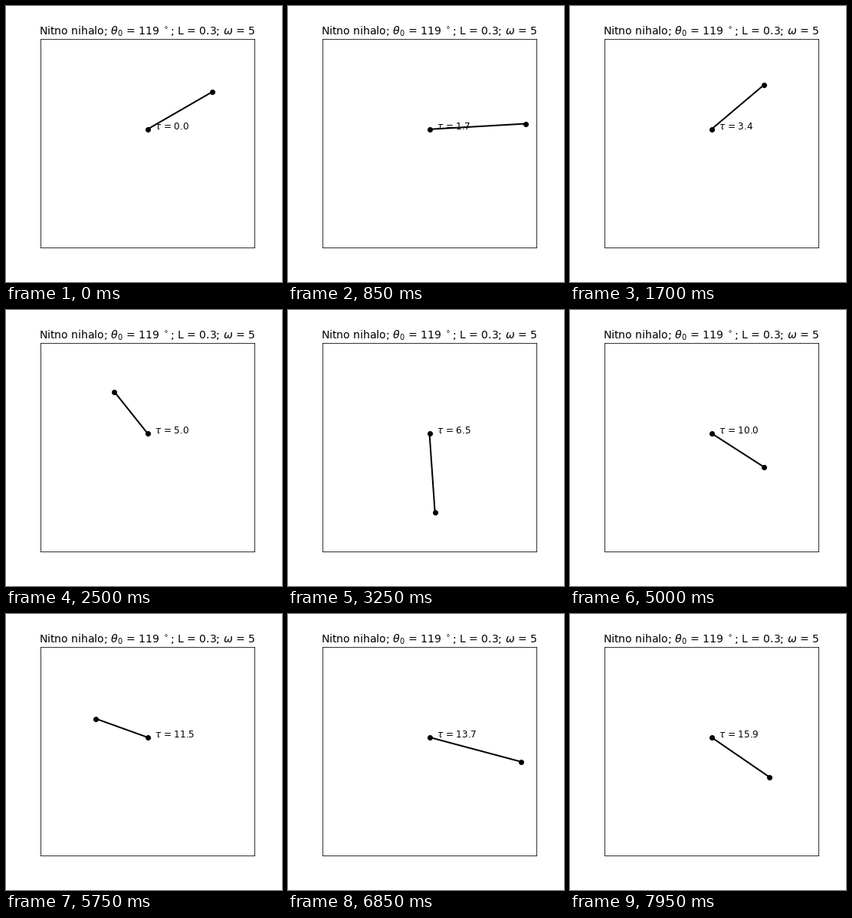
A matplotlib script for the animation above (8000 ms loop, 360 by 360 pixels).

```python
import numpy as np
import matplotlib.pyplot as plt
from matplotlib.animation import FuncAnimation

AMP, OMEGA, THETA0 = 0.3, 5, 2 * np.pi / 3
FRAMES, DT, SUB = 160, 0.1, 100
SCALE, PIVOT_Y = 97.2, 160.8  # pixels per unit, pivot height from the top


def length(t):
    return 1 + AMP * np.sin(t)


def deriv(t, s):
    """String pendulum whose length is driven harmonically."""
    theta, v = s
    rate = AMP * np.cos(t)
    return np.array([v, -(2 * rate * v + OMEGA**2 * np.sin(theta)) / length(t)])


def rk4(t, s, h):
    a = deriv(t, s)
    b = deriv(t + h / 2, s + h / 2 * a)
    c = deriv(t + h / 2, s + h / 2 * b)
    d = deriv(t + h, s + h * c)
    return s + h / 6 * (a + 2 * b + 2 * c + d)


def solve():
    s, h = np.array([THETA0, 0.0]), DT / SUB
    angles = [s[0]]
    for k in range((FRAMES - 1) * SUB):
        s = rk4(k * h, s, h)
        if (k + 1) % SUB == 0:
            angles.append(s[0])
    return np.array(angles)


tau = DT * np.arange(FRAMES)
theta = solve()
xs = length(tau) * np.sin(theta)
ys = -length(tau) * np.cos(theta)

fig = plt.figure(figsize=(5, 5), dpi=72, facecolor="white")
fig.subplots_adjust(left=0.125, right=0.9, bottom=0.125, top=0.88)
ax = fig.add_subplot()
ax.set(xticks=[], yticks=[])
ax.set_xlim(-139.5 / SCALE, 139.5 / SCALE)
ax.set_ylim((PIVOT_Y - 315) / SCALE, (PIVOT_Y - 43.2) / SCALE)
ax.set_title(r"Nitno nihalo; $\theta_0$ = 119 $^\circ$; L = 0.3; $\omega$ = 5",
             fontsize=14)
rod, = ax.plot([], [], "o-", color="black", lw=2)
label = ax.text(0.1, 0, "", fontsize=12)


def update(i):
    rod.set_data([0, xs[i]], [0, ys[i]])
    label.set_text(rf"$\tau$ = {tau[i]:.1f}")
    return rod, label


anim = FuncAnimation(fig, update, frames=FRAMES, interval=50,
                     repeat=True, repeat_delay=0)
plt.show()
```
